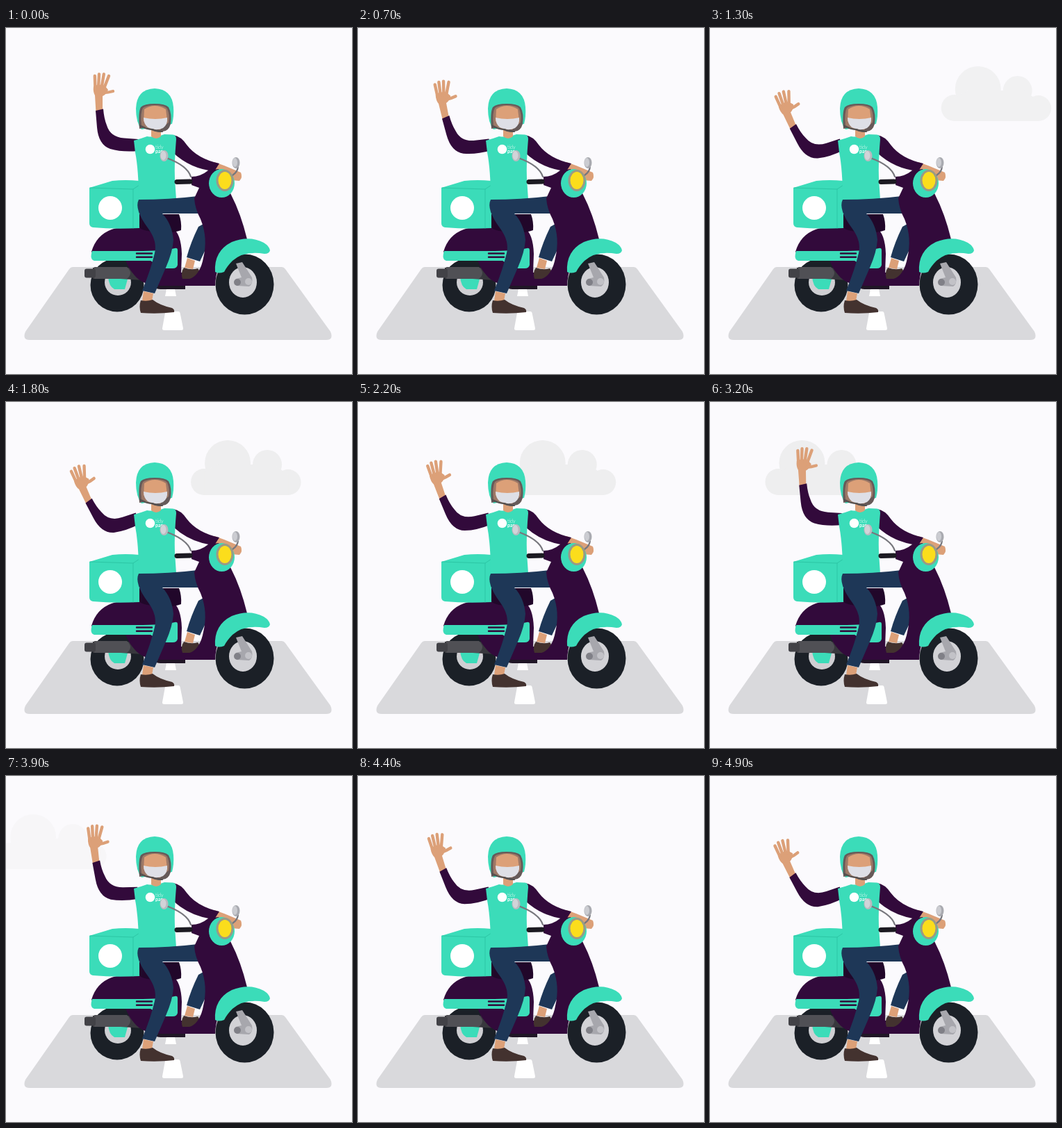
Write an HTML page that moves like this. It is 498 px wide and 498 px high and loops after 5 s.

```html
<!DOCTYPE html>
<html lang="en">
<head>
<meta charset="utf-8">
<title>Waving courier</title>
<style>
  html, body { margin: 0; width: 100%; height: 100%; overflow: hidden; background: #fbfafd; }
  svg { display: block; width: 100%; height: 100%; }
  .teal { fill: #3bdcb9; }
  .plum { fill: #320a3b; }
  .navy { fill: #1e3757; }
  .skin { fill: #dca078; }
  .shoe { fill: #43322f; }
  .tyre { fill: #1b2027; }
  .line { fill: none; stroke-linecap: round; stroke-linejoin: round; }
  text { font: 300 7px Lato, sans-serif; fill: #fff; }
  .bold { font-weight: 700; }
</style>
</head>
<body>
<svg viewBox="0 0 498 498">
  <g id="cloud" fill="#eeeeef" opacity="0">
    <circle cx="19" cy="115" r="19"/>
    <circle cx="53" cy="88" r="33"/>
    <circle cx="110" cy="90" r="21"/>
    <circle cx="140" cy="115.500" r="18.500"/>
    <path d="M19 134V100L40 90H120L140 105V134Z"/>
  </g>

  <!-- road -->
  <path fill="#d9d9dc" d="M96 344H397Q400 344 402 347L467 437Q472 449 461 449H34Q23 449 28 437L91 347Q93 344 96 344Z"/>
  <path fill="#fff" d="M231 376H243L245 386H229ZM231 408H248Q250 408 250.500 410L255 432Q255.500 435 252 435H228Q224.500 435 225 432L229 410Q229.300 408 231 408Z"/>

  <!-- waving arm -->
  <g id="arm">
    <path class="skin" d="M129.500 122L128 97Q125 92 126 84Q134 79 143 84L147 89Q144 96 139 98V120Z"/>
    <path class="line" stroke="#dca078" stroke-width="4.400" d="M128.500 88L127.800 69M133 86L134 66.500M137.500 86L140.800 66.500M141 87L148 69M141 93Q147 93 154 91"/>
    <path class="plum" d="M129 119L140 116.500Q141 130 145 140Q150 157 170 158.500L190 160V177Q167 179 150 174Q133 168 131 143Z"/>
  </g>

  <!-- rear wheel and exhaust -->
  <circle class="tyre" cx="160" cy="370" r="38.500"/>
  <circle fill="#cfcfd3" cx="161" cy="366" r="19"/>
  <path class="teal" d="M147 358H176L171 376H156Q148 372 147 358Z"/>
  <path fill="#38383d" d="M125 345H185L198 363L165 361H125Z"/>
  <path fill="#505055" d="M127 344H174Q184 353 174 361H127Z"/>
  <rect fill="#424247" x="113" y="346.500" width="16" height="13" rx="3"/>

  <!-- rear body -->
  <path fill="#201626" d="M210 368H258V376H222Q214 376 210 368Z"/>
  <path class="plum" d="M123 322Q130 298 152 290Q160 287 175 288H240Q252 296 253 325L252 352H300V371H222Q196 370 185 356Q176 346 172 334H130Z"/>
  <path class="teal" d="M124 321H188Q225 321 243 317Q247 316 247 320V341Q246 346 240 346H226L208 335H127Q120 333 124 321Z"/>
  <path class="line" stroke="#320a3b" stroke-width="2.400" d="M188 324.500H210M188 329.800H210"/>
  <path fill="#21072a" d="M191 268H249Q253 279 252 291Q240 296 222 293Q194 294 189 284Q187 276 191 268Z"/>

  <!-- box -->
  <path class="teal" d="M120 230L153 220Q172 218 192 220V288Q156 290 125 287Q120 286 120 281Z"/>
  <path class="line" stroke="#2cc6a5" stroke-width="1" d="M121 230L183 232L192 226M183 232V288"/>
  <circle fill="#fff" cx="150" cy="259" r="17"/>

  <!-- far leg -->
  <path class="navy" d="M277 286L286 281L289 315L279 336L260 330Q266 308 277 286Z"/>
  <path class="skin" d="M261 331L272 335L269 347L257 345Z"/>
  <path class="shoe" d="M256 345Q267 349 276 346Q280 350 278 358Q277 361 273 361H254Q251 352 256 345Z"/>

  <!-- far arm -->
  <path class="skin" d="M300 193L314 198L338 208Q341 215 336 220L324 219L298 205Z"/>
  <path class="plum" d="M241 154Q252 156 260 168Q275 188 307 195L300 206Q266 203 241 180Z"/>

  <!-- torso -->
  <path class="teal" d="M184 162Q195 159 203 156Q215 158 228 153L240 153.500Q245 154 245 160Q242 195 243 217L245 247H191Q191 205 186 179Z"/>
  <path class="skin" d="M209 143H223V156Q216 162 209 156Z"/>
  <circle fill="#fff" cx="207.500" cy="174.500" r="6.800"/>
  <text x="215" y="174">tidy</text>
  <text class="bold" x="215" y="180">pan</text>

  <!-- head -->
  <path class="teal" d="M187 116Q188 88 214 87Q239 88 241 114Q242 127 239 138L195 146Q187 136 187 116Z"/>
  <path fill="#665a59" d="M192 145Q190 121 194 114Q199 109 214 109Q229 109 234 114Q239 123 237 138Q234 149 225 149Q217 151 209 147L203 143Z"/>
  <path fill="#9d7866" d="M195 140Q193 122 197 115Q204 111 214 111Q228 111 232 116Q236 125 234 136L222 146H207Z"/>
  <path class="skin" d="M199 117Q214 107 230 117L232 133L222 146H208L198 134Z"/>
  <path fill="#dedfe6" d="M198 129Q215 133 232 129Q233 139 226 144Q215 149 204 143Q198 138 198 129Z"/>
  <path class="line" stroke="#55504f" stroke-width="2.200" d="M193 141Q203 146 211 146Q217 149 225 149"/>

  <!-- near leg -->
  <path class="navy" d="M191 247Q235 247 276 242Q286 248 284 267H225Q239 282 241 305Q240 322 230 345L214 382L196 378Q208 349 214 324Q218 307 205 289Q184 261 191 247Z"/>
  <path class="skin" d="M198 379L212 382L210 393H196Z"/>
  <path class="shoe" d="M194 392Q203 394 211 391Q221 399 239 403Q243 405 242 409Q218 412 194 410Q191 401 194 392Z"/>

  <!-- front wheel -->
  <ellipse class="tyre" cx="343.500" cy="369" rx="42" ry="43.500"/>
  <ellipse fill="#d2d2d6" cx="341" cy="366" rx="20" ry="22"/>
  <path fill="#a7a7ad" d="M331 339L340 337L354 359Q356 368 350 372L332 371Q326 366 331 361L339 359Z"/>
  <circle fill="#808087" cx="333" cy="366" r="5"/>
  <circle fill="#c2c2c7" cx="349" cy="365" r="5"/>

  <!-- front column -->
  <path class="plum" d="M267 214Q280 214 291 205L306 203L324 240Q338 267 347 304L318 324Q302 342 301 371H256Q255 363 267 360Q280 353 284 331Q291 302 280 275Q272 260 271 245L278 230L267 226Z"/>
  <path class="teal" d="M301 351Q299 321 325 308Q350 298 371 309Q379 314 380 320Q379 325 372 325Q343 320 326 335Q318 343 314 351Q306 354 301 351Z"/>
  <path class="line" stroke="#1c1a22" stroke-width="7" d="M246 221.500L265 221"/>

  <!-- lamp and mirrors -->
  <path class="line" stroke="#77777d" stroke-width="2.200" d="M231 187Q261 198 266 214M334 198Q334 207 326 212"/>
  <ellipse fill="#b9bac0" cx="227.500" cy="184" rx="6" ry="8"/>
  <ellipse fill="#d2d3d8" cx="226.500" cy="183.500" rx="4" ry="6.500"/>
  <ellipse fill="#a9aab0" cx="331" cy="194" rx="5.500" ry="8"/>
  <ellipse fill="#cbccd1" cx="329.500" cy="193.500" rx="3.500" ry="6.500"/>
  <ellipse class="teal" cx="310.500" cy="223.500" rx="18.500" ry="20.500"/>
  <ellipse fill="#fbdd1c" stroke="#9a9a86" stroke-width="3" cx="315" cy="219.500" rx="11" ry="14"/>
</svg>
<script>
  const cloud = document.getElementById("cloud");
  const arm = document.getElementById("arm");
  const LOOP = 5000, STEP = 100, SWING = -23.4;
  const waves = [[0, 0], [1500, 1], [1650, 1], [3400, 0], [4950, 1], [LOOP, 1]];

  const clamp = x => Math.max(0, Math.min(1, x));
  const ramp = (t, from, to) => clamp((t - from) / (to - from));
  const ease = s => s * s * (3 - 2 * s);

  function wave(t) {
    const i = waves.findIndex(([end]) => end > t);
    const [t0, a] = waves[i - 1], [t1, b] = waves[i];
    return a + (b - a) * ease(ramp(t, t0, t1));
  }

  function draw(now) {
    const t = Math.floor((now % LOOP) / STEP) * STEP;
    arm.setAttribute("transform", `rotate(${SWING * wave(t)} 187 168)`);
    cloud.setAttribute("transform", `translate(${506 - t * 0.1333} 0)`);
    cloud.setAttribute("opacity", ramp(t, 800, 1500) * (1 - ramp(t, 3300, 4150)));
    requestAnimationFrame(draw);
  }
  draw(performance.now());
</script>
</body>
</html>
```
